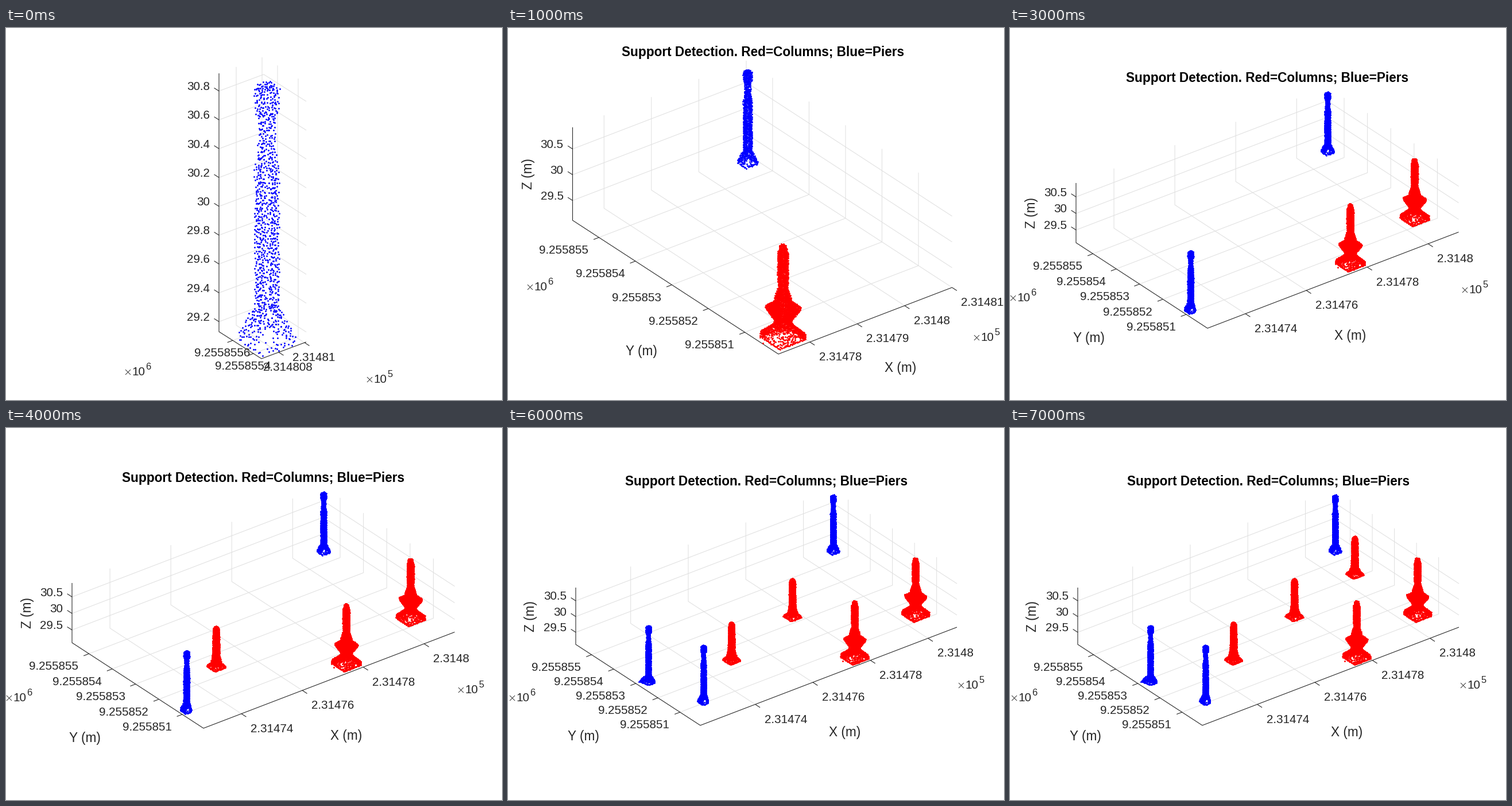
A matplotlib script for the animation above (8 s loop, 864 px wide and 648 px high).

```python
import numpy as np
import matplotlib.pyplot as plt
from matplotlib.animation import FuncAnimation

W, H = 864, 648
INK = (0.15, 0.15, 0.15)
GRID = (0.875, 0.875, 0.875)
TICK_SIZE, LABEL_SIZE = 20.6, 22.6
TITLE = "Support Detection. Red=Columns; Blue=Piers"

# Screen directions of the ground axes, for a square of half-width 1
EX, EY = np.array((.565, -.218)), np.array((.436, .283))

plt.rcParams["font.family"] = "Liberation Sans"
fig = plt.figure(figsize=(W / 72, H / 72), dpi=72, facecolor="white")
ax = fig.add_axes([0, 0, 1, 1])

# Outlines as (depth below top, half-width)
PIER = [(3, 0.6), (3, 5.1), (13, 5.1), (14, 3.5), (27, 3.5), (36, 5),
        (92, 5.1), (95.4, 7.2), (102, 11), (105, 11.8)]
TALL = [(2, 0.6), (2, 4), (7, 4.6), (10, 6), (42, 6), (48, 5.3), (61, 9.6),
        (66, 10), (70, 20.2), (74, 19), (84, 10.5), (88, 9.5), (93, 15),
        (99, 25), (105, 25.8)]
SHORT = [(2, 0.6), (2, 3), (5, 5), (10, 5.6), (40, 6), (52, 6.4), (60, 8),
         (66, 10), (69, 15.5), (71, 16.8)]


def cloud(outline, step, seed, thin, keep):
    """Scatter points over stacked square rings; below `thin` faces have gaps."""
    rng = np.random.default_rng(seed)
    y, r = np.array(outline, float).T
    run = np.r_[0, np.cumsum(np.hypot(np.diff(y), np.diff(r)))]
    stops = np.linspace(0, run[-1], int(run[-1] / step) + 1)
    parts = []
    for s in stops:
        rad, depth = np.interp(s, run, r), np.interp(s, run, y)
        n = max(4, round(2 * np.pi * rad / step))
        a = (np.arange(n) + rng.random() + rng.uniform(-.35, .35, n)) * 2 * np.pi / n
        c, d = np.cos(a), np.sin(a)
        edge = rad / np.maximum(abs(c), abs(d))
        pts = np.outer(c * edge, EX) + np.outer(d * edge, EY)
        pts += rng.uniform(-.3, .3, (n, 2))
        pts[:, 1] += depth + rng.uniform(-.4, .4, n) * step
        if depth > thin and s < stops[-1]:
            face = abs(pts[:, 0]) < 0.75 * rad
            pts = pts[~face | (rng.random(n) < keep)]
        parts.append(pts)
    return np.vstack(parts)


def pier(seed, left=1, right=1):
    """A pier whose foot is stretched by its own factor on each side."""
    p = cloud(PIER, 1.8, seed, 97, 0.5)
    x = p[:, 0]
    over = np.maximum(np.abs(x) - 5.5, 0)
    p[:, 0] = np.sign(x) * (np.abs(x) - over + over * np.where(x < 0, left, right))
    return p


def tall(seed):
    return cloud(TALL, 1.5, seed, 92, 0.33)


def short(seed):
    return cloud(SHORT, 1.5, seed, 67, 0.4)


def place(points, x, y, color):
    return points + (x, y), color


# Supports in the order they are found
SUPPORTS = [
    place(pier(1), 553, 110.5, "blue"),
    place(np.vstack([tall(2), (-22, 111)]), 592.5, 306, "red"),
    place(pier(3, 0.95, 0.5), 314.5, 387, "blue"),
    place(tall(4), 704.5, 227, "red"),
    place(short(5), 366, 344.5, "red"),
    place(short(6), 478, 264.5, "red"),
    place(pier(7, 2, 1.05), 213, 351, "blue"),
    place(short(8), 589, 186.5, "red"),
]


def steps(first, gap, n):
    return [first + gap * k for k in range(n)]


Z3 = dict(zip(steps(.213, .277, 3), ["29.5", "30", "30.5"]))
Y5 = ["9.25585%d" % k for k in (5, 4, 3, 2, 1)]
X_WIDE = ["2.31474", "2.31476", "2.31478", "2.3148"]

# view: scale, x shift, y shift applied to the supports
CLOSE = dict(
    left=(371, 529), front=(445, 576), right=(523, 547), h=450,
    x={.385: "2.314808", .962: "2.31481"},
    y={.324: "9.2558556", .81: "9.2558554"},
    z={.0387 + .1116 * k: f"{29.2 + .2 * k:g}" for k in range(9)},
    centred=True, exp=[(207, 598, "6"), (628, 611, "5")],
    view=(4.33, 454 - 4.33 * 553, 87 - 4.33 * 110))
PAIR = dict(
    left=(112.5, 335), front=(471, 568), right=(773.5, 452), h=162,
    x=dict(zip(steps(.181, .273, 4), ["2.31478", "2.31479", "2.3148", "2.31481"])),
    y=dict(zip(steps(.128, .1772, 5), Y5)), z=Z3,
    title=(443.5, 41), xlab=(684, 591), ylab=(232, 561.5), zlab=(34, 254),
    exp=[(33, 450, "6"), (811, 538, "5")],
    view=(1.558, 417.2 - 1.558 * 553, 70.5 - 1.558 * 110))
WIDE = dict(
    left=(115, 374), front=(344, 523), right=(781.5, 355.5), h=104,
    x=dict(zip(steps(.151, .2425, 4), X_WIDE)),
    y=dict(zip(steps(.129, .1773, 5), Y5)), z=Z3,
    title=(448.5, 86), xlab=(592.5, 534.5), ylab=(137, 539), zlab=(36, 322),
    exp=[(0, 469, "6"), (787, 455, "5")],
    view=(1, 0, 0))
WIDER = dict(
    left=(118, 377), front=(335, 518), right=(782, 347), h=99,
    x=dict(zip(steps(.214, .2244, 4), X_WIDE)),
    y=dict(zip(steps(.127, .1775, 5), Y5)), z=Z3,
    title=(450.5, 91.5), xlab=(586.5, 528.5), ylab=(131.5, 536), zlab=(38, 328),
    exp=[(2, 469, "6"), (784, 447, "5")],
    view=(.9465, 42.8, 11))

SCENES = [CLOSE, PAIR] + [WIDE] * 4 + [WIDER] * 2


def line(*pts, color=INK, lw=1.1, z=2):
    ax.plot(*np.array(pts).T, color=color, lw=lw, zorder=z, solid_capstyle="butt")


def text(x, y, s, size=TICK_SIZE, ha="center", color=INK, **kw):
    """Text whose capitals are centred on y."""
    ax.text(x, y + .355 * size, s, fontsize=size, ha=ha, va="baseline",
            color=color, zorder=4, **kw)


def unit(v):
    return v / np.hypot(*v)


def exponent(x, y, power):
    line((x + 1, y - 3), (x + 10, y + 6), lw=0.9)
    line((x + 1, y + 6), (x + 10, y - 3), lw=0.9)
    text(x + 12, y, "10", ha="left")
    text(x + 36.3, y - 9, power, size=16.5, ha="left")


def draw_axes(s):
    left, front, right = (np.array(s[k], float) for k in ("left", "front", "right"))
    u, v, up = right - front, front - left, np.array((0, -s["h"]))
    centred = s.get("centred")

    def mark(p, out, *grid):
        line(p, *grid, color=GRID, lw=1, z=1)
        line(p, p + 10 * unit(out))

    for t, label in s["x"].items():
        p = front + t * u
        mark(p, v, p - v, p - v + up)
        text(p[0] + 16, p[1] + 24.8, label, ha="center" if centred else "left")
    for t, label in s["y"].items():
        p = left + t * v
        mark(p, -u, p + u, p + u + up)
        text(p[0] - 18.3, p[1] + 20.8, label, ha="center" if centred else "right")
    for t, label in s["z"].items():
        p = left + t * up
        mark(p, -v, p + u, p + u + v)
        text(p[0] - 16, p[1] - 9, label, ha="right")
    line(left + up, left, front, right)

    for e in s["exp"]:
        exponent(*e)
    if "title" in s:
        text(*s["title"], TITLE, LABEL_SIZE, color="black", weight="bold")
        text(*s["xlab"], "X (m)", LABEL_SIZE)
        text(*s["ylab"], "Y (m)", LABEL_SIZE)
        x, y = s["zlab"]
        ax.text(x + .355 * LABEL_SIZE, y, "Z (m)", fontsize=LABEL_SIZE, color=INK,
                rotation=90, rotation_mode="anchor", ha="center", va="baseline")


def draw(i):
    ax.clear()
    ax.set(xlim=(0, W), ylim=(H, 0))
    ax.axis("off")
    scene = SCENES[i]
    draw_axes(scene)
    k, dx, dy = scene["view"]
    for pts, color in SUPPORTS[:i + 1]:
        ax.plot(pts[:, 0] * k + dx, pts[:, 1] * k + dy, "o", ms=2.9, mew=0,
                color=color, zorder=3)
    return []


anim = FuncAnimation(fig, draw, frames=len(SCENES), interval=1000, repeat=True,
                     repeat_delay=0, blit=False)
plt.show()
```
